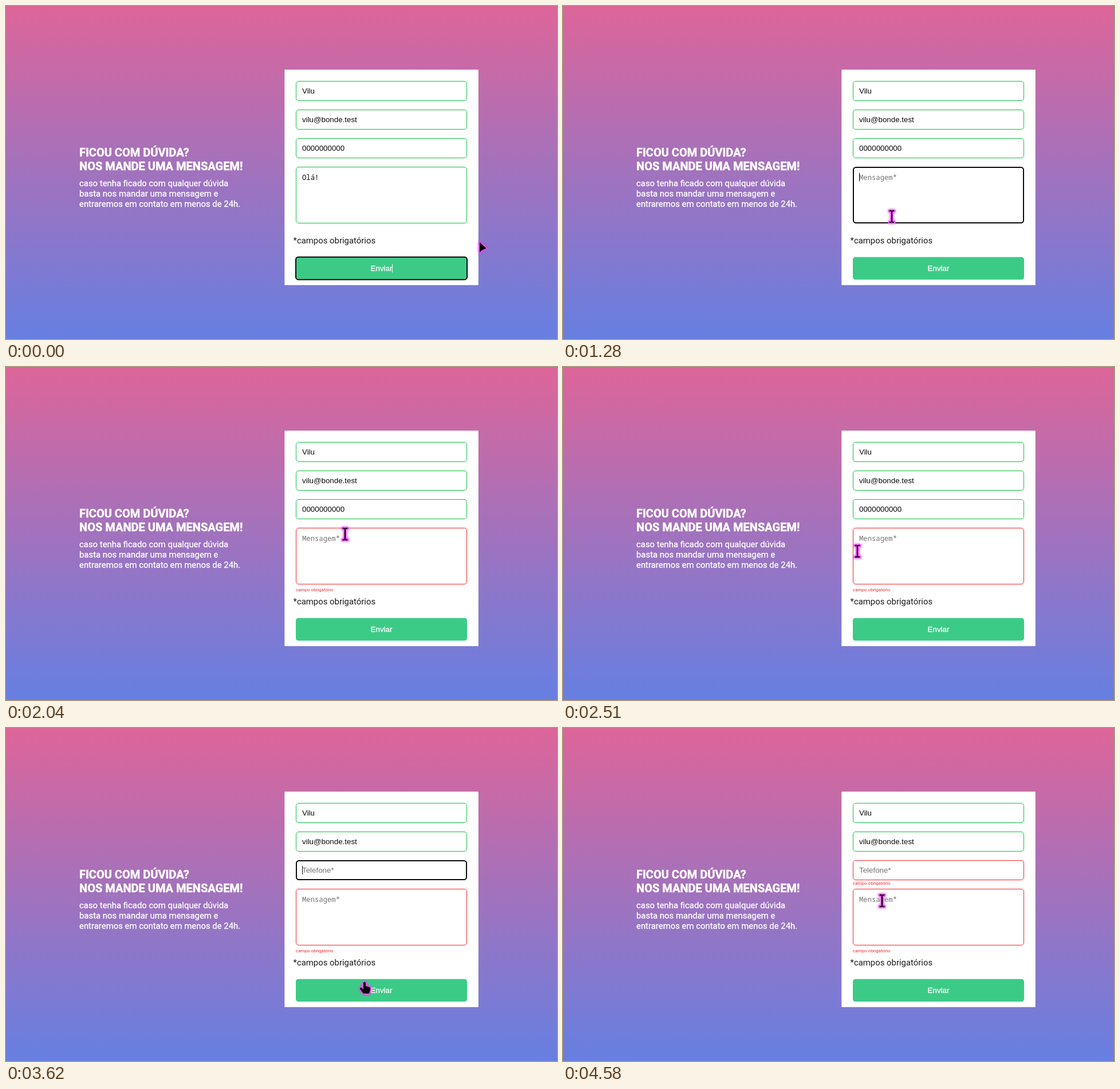
An HTML page with a canvas for the animation above (4780 ms loop, 962 by 582 pixels).

```html
<!DOCTYPE html>
<html lang="pt-BR">
<head>
<meta charset="utf-8">
<title>Contato</title>
<style>
  html, body { margin: 0; width: 100%; height: 100%; overflow: hidden; background: #a272bc; }
  canvas { display: block; width: 962px; height: 582px; }
</style>
</head>
<body>
<canvas id="stage" width="962" height="582"></canvas>
<script>
const ctx = document.getElementById('stage').getContext('2d');
const LOOP = 4780, STEP = 70;
const GREEN = '#10c244', RED = '#f3282e', BLACK = '#0b0b0d', HINT = '#757575';
const SANS = '13.333px "Liberation Sans", Arial, sans-serif';
const MONO = '12.22px "Noto Sans Mono", monospace';
const TITLE = '700 20px Roboto, sans-serif';
const BODY = '14.9px Roboto, sans-serif';
const SMALL = '8px Roboto, sans-serif';

// When the user acts, in ms
const at = {
  noteFocus: 660, noteDrag: 720, noteDrop: 930, noteErase: 1015, send: 1485,
  phoneDrag: 2640, phoneDrop: 3065, phoneErase: 3190, resend: 3755
};

// Turning points of the pointer: step, x, y
const path = [
  [3, 827, 413], [8, 599, 335], [12, 497, 301], [14, 503, 304],
  [18, 574, 368], [21, 645, 464], [23, 644, 462], [27, 618, 349],
  [29, 592, 292], [35, 514, 322], [37, 597, 249], [41, 516, 250],
  [45, 508, 252], [50, 628, 432], [51, 626, 444], [53, 629, 453],
  [58, 605, 325], [61, 515, 308], [63, 545, 290], [65, 557, 302]
];

const within = (v, a, b) => v >= a && v < b;

function pointerAt(step) {
  const next = path.findIndex(p => step < p[0]);
  if (next < 1) return path.at(next).slice(1);
  const [s0, x0, y0] = path[next - 1], [s1, x1, y1] = path[next];
  const p = (step - s0) / (s1 - s0);
  return [x0 + (x1 - x0) * p, y0 + (y1 - y0) * p];
}

function text(str, x, y, font, color, weight = 0) {
  ctx.font = font;
  ctx.fillStyle = ctx.strokeStyle = color;
  ctx.fillText(str, x, y);
  if (!weight) return;
  ctx.lineWidth = weight;
  ctx.lineJoin = 'round';
  ctx.strokeText(str, x, y);
}

function roundBox(x, y, w, h, r) {
  ctx.beginPath();
  ctx.roundRect(x, y, w, h, r);
}

function field(y, h, color, focused) {
  const w = focused ? 2 : 1;
  roundBox(506 + w / 2, y + w / 2, 299 - w, h - w, 4.5);
  ctx.fillStyle = '#fff';
  ctx.fill();
  ctx.lineWidth = w;
  ctx.strokeStyle = focused ? BLACK : color;
  ctx.stroke();
}

function caret(x, y, color) {
  ctx.fillStyle = color;
  ctx.fillRect(x, y, 1, 15);
}

// Typed text, highlighted from the character nearest to px onwards
function typed(str, y, font, px = Infinity) {
  text(str, 517, y, font, BLACK);
  const step = ctx.measureText(str).width / str.length;
  const first = Math.max(0, Math.round((px - 517) / step));
  if (first >= str.length) return;
  const x = 517 + first * step;
  ctx.fillStyle = '#2e63c9';
  ctx.fillRect(x, y - 13, (str.length - first) * step, 16);
  text(str.slice(first), x, y, font, '#fff');
}

function emptyField(hint, y, font, focused) {
  text(hint, 517, y, font, HINT);
  if (focused) caret(517, y - 12, BLACK);
}

function background() {
  const g = ctx.createLinearGradient(0, 0, 0, 582);
  g.addColorStop(0, '#dd6599');
  g.addColorStop(1, '#667fe1');
  ctx.fillStyle = g;
  ctx.fillRect(0, 0, 962, 582);
  ['FICOU COM DÚVIDA?', 'NOS MANDE UMA MENSAGEM!'
  ].forEach((line, i) => text(line, 128, 263 + i * 24, TITLE, '#fff', 0.5));
  ['caso tenha ficado com qualquer dúvida', 'basta nos mandar uma mensagem e',
    'entraremos em contato em menos de 24h.'
  ].forEach((line, i) => text(line, 128, 315 + i * 18, BODY, '#fff', 0.3));
}

function sendButton(focused) {
  roundBox(506, 438.7, 299, 39.5, 4.5);
  ctx.fillStyle = '#3ccb87';
  ctx.fill();
  if (focused) {
    ctx.lineWidth = 2;
    ctx.strokeStyle = BLACK;
    ctx.stroke();
  }
  text('Enviar', 636.6, 462.7, SANS, '#fff', 0.3);
}

function form(t, px) {
  const noteFocus = within(t, at.noteFocus, at.send);
  const phoneFocus = within(t, at.phoneDrag, at.resend);
  const noteBad = t >= at.send, phoneBad = t >= at.resend;

  ctx.fillStyle = '#fff';
  ctx.fillRect(486.3, 111.2, 338.5, 376.6);

  ['Vilu', 'vilu@bonde.test'].forEach((value, i) => {
    field(131 + i * 50, 35, GREEN);
    typed(value, 153 + i * 50, SANS);
  });

  field(231, 35, phoneBad ? RED : GREEN, phoneFocus);
  if (t < at.phoneErase) typed('0000000000', 253, SANS, phoneFocus ? px : Infinity);
  else emptyField('Telefone*', 253, SANS, phoneFocus);
  if (phoneBad) text('campo obrigatório', 506, 273.5, SMALL, RED);

  field(281, 99, noteBad ? RED : GREEN, noteFocus);
  if (t < at.noteErase) typed('Olá!', 303.5, MONO, t >= at.noteDrag ? px : Infinity);
  else emptyField('Mensagem*', 303.5, MONO, noteFocus);
  if (noteBad) text('campo obrigatório', 506, 391.5, SMALL, RED);

  text('*campos obrigatórios', 501.5, 415, BODY, '#1c1c20');
  sendButton(t < at.noteFocus);
  if (t < 270) caret(674, 451, '#e6fff2');
}

const beam = new Path2D('M-4-10H-1.5L0-9L1.5-10H4M0-9V9M-4 10H-1.5L0 9L1.5 10H4');
const arrow = new Path2D('M0 0V17.5L4.5 13.5L11.5 10.5Z');
const hand = new Path2D('M-2 1Q0-1 2 1V7L9 9Q10.5 10 10 13L8 20H-2L-8 12Q-8 9-5 10L-2 13Z');

function glow(shape, width) {
  ctx.lineJoin = ctx.lineCap = 'round';
  ctx.lineWidth = width;
  ctx.strokeStyle = '#e84fee';
  ctx.shadowColor = '#e535ee';
  ctx.shadowBlur = 4;
  ctx.stroke(shape);
  ctx.shadowBlur = 0;
}

function pointer(t, x, y) {
  const dragging = within(t, at.noteDrag, at.noteDrop) || within(t, at.phoneDrag, at.phoneDrop);
  const clicking = [at.send, at.resend].some(c => within(t, c, c + STEP));
  const inX = within(x, 506, 805);
  const onField = inX && (within(y, 231, 266) || within(y, 281, 380));
  const onButton = inX && within(y, 438.5, 479);
  ctx.save();
  ctx.translate(x, y);
  ctx.fillStyle = '#080008';
  if (onField || dragging) {
    glow(beam, 5);
    ctx.lineCap = 'butt';
    ctx.lineWidth = 2;
    ctx.strokeStyle = '#080008';
    ctx.stroke(beam);
  } else {
    const shape = onButton ? hand : arrow;
    glow(shape, 3.5);
    ctx.fill(shape);
  }
  if (dragging || clicking) {
    ctx.beginPath();
    ctx.arc(0, 0, 10, 0, Math.PI * 2);
    ctx.fillStyle = 'rgba(250, 222, 70, 0.62)';
    ctx.fill();
  }
  ctx.restore();
}

const start = performance.now();
function draw() {
  const step = Math.floor(((performance.now() - start) % LOOP - 10) / STEP);
  const t = step * STEP + 10;
  const [x, y] = pointerAt(step);
  background();
  form(t, x);
  pointer(t, x, y);
  requestAnimationFrame(draw);
}
draw();
</script>
</body>
</html>
```
